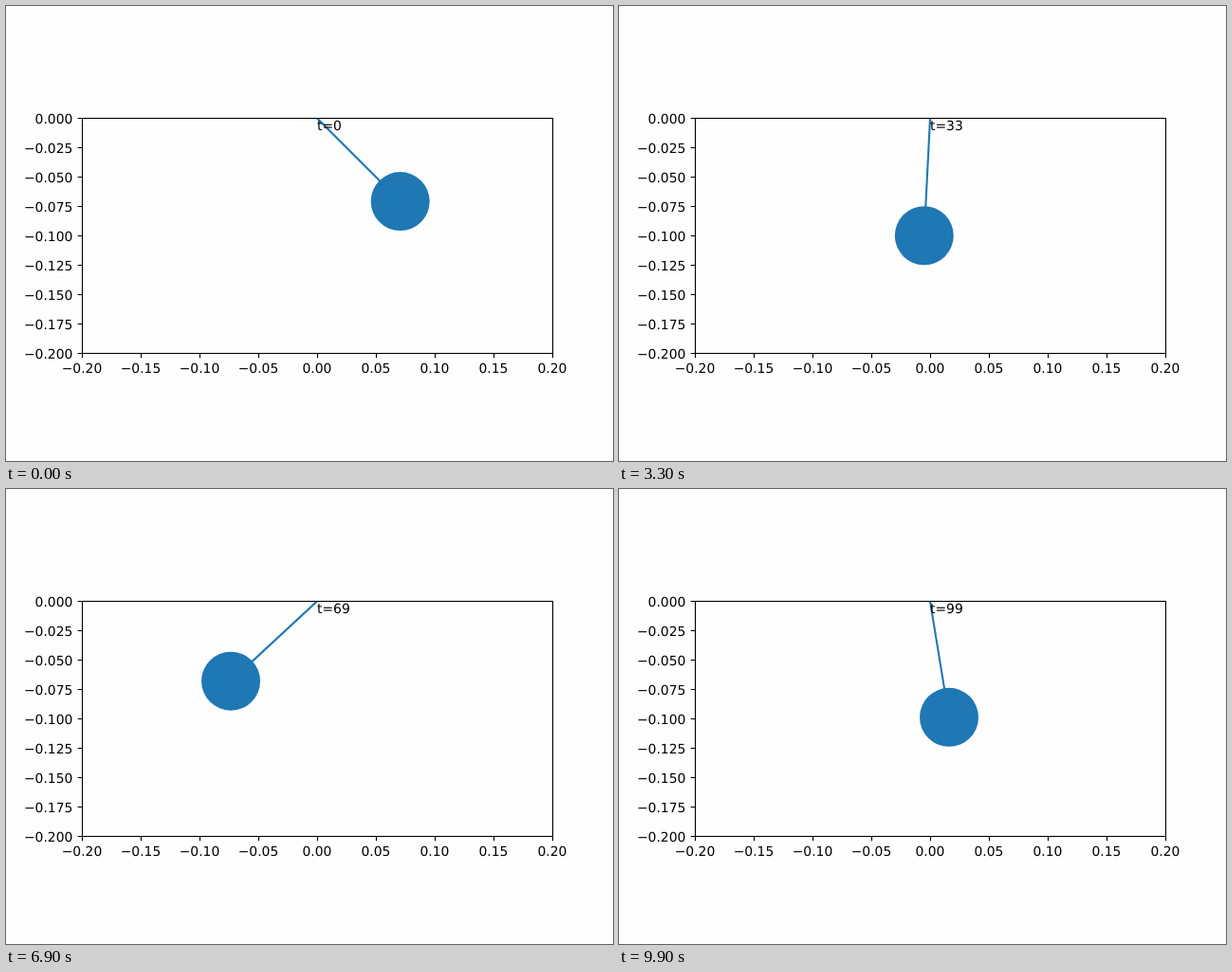
An HTML page for the animation above (10000 ms loop, 640 by 480 pixels).

```html
<!DOCTYPE html>
<html lang="en">
<head>
<meta charset="utf-8">
<title>Pendulum</title>
<style>
  html, body { margin: 0; width: 100%; height: 100%; overflow: hidden; background: #fefefe; }
  svg { display: block; width: 640px; height: 480px; }
  text { font: 13.89px "DejaVu Sans", sans-serif; text-rendering: geometricPrecision; }
  .axes { fill: none; stroke: #000; stroke-width: 1.11; }
</style>
</head>
<body>
<svg viewBox="0 0 640 480">
  <clipPath id="plot"><rect x="80" y="118.4" width="496" height="248"/></clipPath>
  <g clip-path="url(#plot)">
    <circle id="bob" r="31" fill="#1f77b4"/>
    <line id="rod" x1="328" y1="118.4" stroke="#1f77b4" stroke-width="2.08" stroke-linecap="square"/>
  </g>
  <rect class="axes" x="80.5" y="118.5" width="496" height="248"/>
  <path id="ticks" class="axes"/>
  <g id="labels"></g>
  <text id="time" x="328" y="131"></text>
</svg>
<script>
const el = id => document.getElementById(id);
const format = (v, digits) => v.toFixed(digits).replace('-', '\u2212');

let ticks = '', labels = '';
for (let i = 0; i < 9; i++) {
  const x = 80 + 62 * i, y = 118 + 31 * i;
  ticks += `M${x + 0.5} 366.5v4.86M80.5 ${y + 0.5}h-4.86`;
  labels += `<text x="${x}" y="387" text-anchor="middle">${format((i - 4) / 20, 2)}</text>` +
            `<text x="70.3" y="${y + 6}" text-anchor="end">${format(-i / 40, 3)}</text>`;
}
el('ticks').setAttribute('d', ticks);
el('labels').innerHTML = labels;

// Explicit Euler steps of a linear pendulum, in closed form: the swing slowly grows.
const w = Math.sqrt(9.8 / 0.1) * 0.005;
const angle = n => Math.PI / 4 * (1 + w * w) ** (n / 2) * Math.cos(n * Math.atan(w));

function draw() {
  const step = Math.floor(performance.now() / 100) % 100;
  const a = angle(step);
  const x = 328 + 124 * Math.sin(a), y = 118.4 + 124 * Math.cos(a);
  el('bob').setAttribute('cx', x);
  el('bob').setAttribute('cy', y);
  el('rod').setAttribute('x2', x);
  el('rod').setAttribute('y2', y);
  el('time').textContent = 't=' + step;
  requestAnimationFrame(draw);
}
draw();
</script>
</body>
</html>
```
